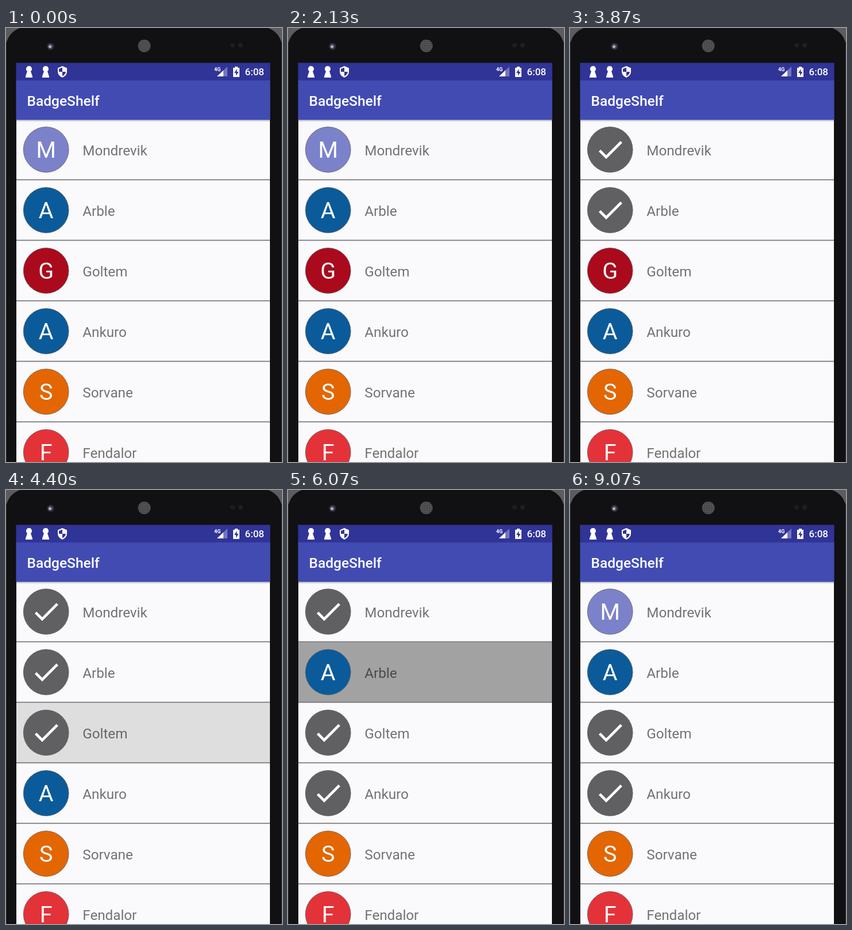
An HTML page for the animation above (9.14 s loop, 480 px wide and 753 px high).

```html
<!DOCTYPE html>
<html lang="en">
<head>
<meta charset="utf-8">
<title>Badge list</title>
<style>
  html, body { margin: 0; width: 100%; height: 100%; overflow: hidden; background: #111013; }
  svg { display: block; width: 480px; height: 753px; }
  text { font-family: Roboto, sans-serif; fill: #fff; }
  .name { font-size: 24.2px; fill: #000; fill-opacity: .54; }
  .letter { font-size: 39.5px; text-anchor: middle; }
  .title { font-size: 24.5px; font-weight: 500; }
  .clock { font-size: 17px; font-weight: 500; }
  .net { font-size: 9px; font-weight: 700; }
</style>
</head>
<body>
<svg viewBox="0 0 480 753">
  <defs>
    <linearGradient id="shade" x2="0" y2="1">
      <stop offset="0" stop-color="#000" stop-opacity=".25"/><stop offset="1" stop-color="#000" stop-opacity="0"/>
    </linearGradient>
    <pattern id="mesh" width="3" height="3" patternUnits="userSpaceOnUse">
      <rect width="3" height="3" fill="#3b3a3c"/><circle cx="1.5" cy="1.5" r="1.1" fill="#6c6b6d"/>
    </pattern>
    <path id="pin" d="M0-10a5 5 0 0 1 3 9l3 9v2h-12v-2l3-9a5 5 0 0 1 3-9z" fill="#fff"/>
    <path id="tick" d="M9 16.17 4.83 12 3.41 13.41 9 19 21 7 19.59 5.59z" fill="#fff"/>
  </defs>

  <rect width="480" height="753" fill="#111013"/>
  <path d="M0 0H24Q5 7 0 28zM480 0H456Q475 7 480 28z" fill="#5c5b5e"/>
  <path d="M.5 753V28M479.5 753V28" stroke="#353437"/>

  <circle cx="77.500" cy="32" r="6.500" fill="#29282d"/>
  <circle cx="77" cy="32" r="4" fill="#565c6c"/>
  <circle cx="76.500" cy="32.500" r="2" fill="#c3cad6"/>
  <circle cx="240.500" cy="31" r="11" fill="url(#mesh)"/>
  <circle cx="394" cy="30" r="4" fill="#1d1c1f"/>
  <circle cx="408" cy="30" r="4" fill="#1f1e21"/>

  <rect x="18" y="61" width="441" height="692" fill="#faf9fb"/>
  <g id="list"></g>
  <rect x="18" y="159.500" width="441" height="3.500" fill="url(#shade)"/>
  <rect x="17.500" y="60.500" width="442" height="31" fill="#303497"/>
  <rect x="17.500" y="91" width="442" height="68.500" fill="#414bb2"/>

  <use href="#pin" x="40" y="76"/>
  <use href="#pin" x="69" y="76"/>
  <path d="M98 66l8 3.500v6q0 7-8 10.500q-8-3.500-8-10.500v-6z" fill="#fff"/>
  <path d="M98 68.500V76h6q-.500 5-6 7.500V76h-6v-5z" fill="#303497"/>
  <path d="M385 67V84H367z" fill="#7376bb"/>
  <path d="M378 73.600V84H367z" fill="#fff"/>
  <text class="net" x="362" y="75">4G</text>
  <path d="M395 69h3v-2h5v2h3v16h-11z" fill="#fff"/>
  <path d="M401.500 71l-4.500 7h3v5l4.500-7h-3z" fill="#303497"/>
  <text class="clock" x="415.500" y="82">6:08</text>
  <text class="title" x="36.500" y="134.500">BadgeShelf</text>
</svg>
<script>
const LOOP = 9140, PITCH = 105;
const ROWS = [
  ['Mondrevik', '#7b82ca'],
  ['Arble', '#0b5b9a'],
  ['Goltem', '#aa0a1c'],
  ['Ankuro', '#0b5b9a'],
  ['Sorvane', '#e36603'],
  ['Fendalor', '#e43239']
];
// [row, time of press]; the badge flips when the press is released
const TAPS = [[0, 2130], [1, 3340], [2, 4070], [3, 4800], [1, 5870], [0, 6770]];
const RISE = 70, HOLD = 190, FALL = 200;
const CHECKED = '#605f61';

const list = document.getElementById('list');

function add(parent, tag, attrs, text) {
  const el = document.createElementNS('http://www.w3.org/2000/svg', tag);
  for (const key in attrs) el.setAttribute(key, attrs[key]);
  if (text) el.textContent = text;
  return parent.appendChild(el);
}

const rows = ROWS.map(([name, color], i) => {
  const g = add(list, 'g', { transform: `translate(0 ${159 + PITCH * i})` });
  const glow = add(g, 'rect', { x: 18, width: 441, height: 104, fill: '#9e9d9e', opacity: 0 });
  add(g, 'rect', { x: 18, y: 103.5, width: 441, height: 1.7, fill: '#777678' });
  const disc = add(g, 'circle', { cx: 69.7, cy: 52, r: 39.4, fill: color, stroke: CHECKED, 'stroke-width': .8 });
  const letter = add(g, 'text', { class: 'letter', x: 69.7, y: 66 }, name[0]);
  const tick = add(g, 'use', { href: '#tick', transform: 'translate(42 24) scale(2.33)' });
  add(g, 'text', { class: 'name', x: 133.3, y: 62 }, name);
  return { color, glow, disc, letter, tick };
});

const clamp = v => Math.max(0, Math.min(1, v));
const pressLevel = dt => Math.min(clamp(dt / RISE), clamp(1 - (dt - HOLD) / FALL));

function draw(t) {
  rows.forEach((row, i) => {
    let checked = false, level = 0;
    for (const [target, at] of TAPS) {
      if (target !== i || t < at) continue;
      if (t >= at + HOLD) checked = !checked;
      level = Math.max(level, pressLevel(t - at));
    }
    row.glow.setAttribute('opacity', level);
    row.disc.setAttribute('fill', checked ? CHECKED : row.color);
    row.letter.style.display = checked ? 'none' : '';
    row.tick.style.display = checked ? '' : 'none';
  });
}

const start = performance.now();
function frame() {
  draw((performance.now() - start) % LOOP);
  requestAnimationFrame(frame);
}
frame();
</script>
</body>
</html>
```
